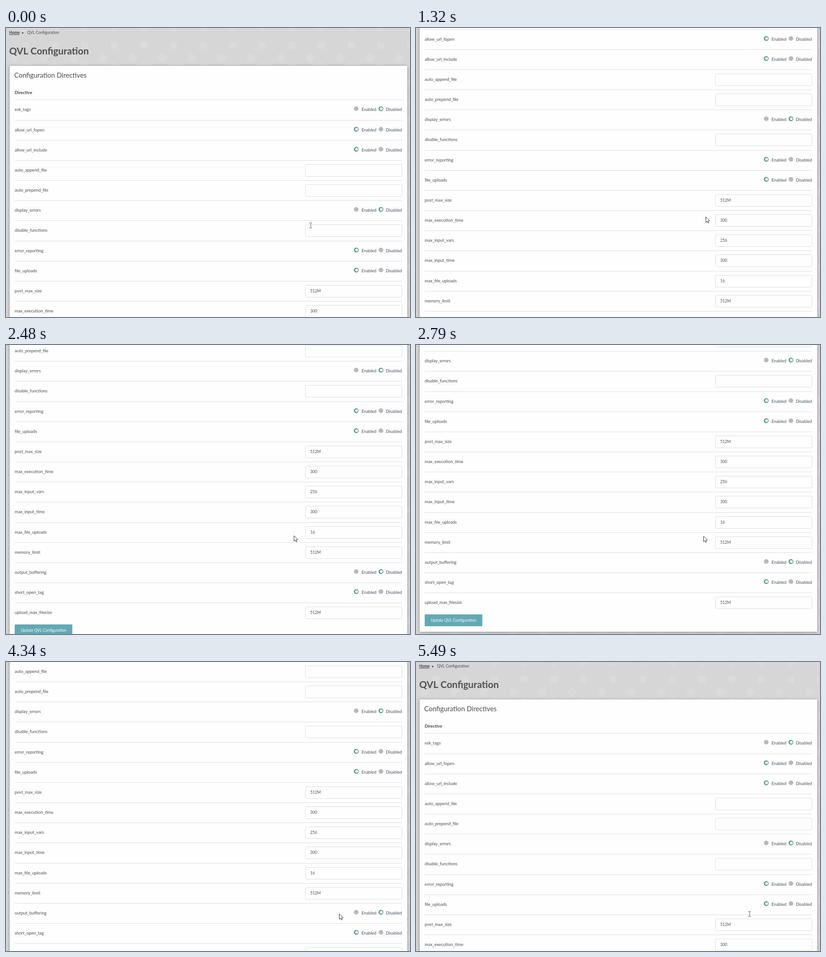
Recreate the animation shown at these times as an HTML page with a canvas. Size 883 by 634 pixels, loop 5.57 s.

```html
<!DOCTYPE html>
<html lang="en">
<head>
<meta charset="utf-8">
<title>Configuration</title>
<style>
html, body { margin: 0; width: 100%; height: 100%; overflow: hidden; background: #d6d6d6; }
canvas { display: block; }
</style>
</head>
<body>
<canvas id="stage" width="883" height="634"></canvas>
<script>
const W = 883, H = 634, LOOP = 5570;
const STEPS = 72, STEP = LOOP / STEPS;
const TOP = 157.4, PITCH = 44.17;
const FONT = 'Lato, "Open Sans", sans-serif';
const INK = '#4b4b4b';

const ctx = document.getElementById('stage').getContext('2d');

// true/false: radio state, string: text field
const rows = Object.entries({
  esk_tags: false, allow_url_fopen: true, allow_url_include: true,
  auto_append_file: '', auto_prepend_file: '', display_errors: false,
  disable_functions: '', error_reporting: true, file_uploads: true,
  post_max_size: '512M', max_execution_time: '300', max_input_vars: '256',
  max_input_time: '300', max_file_uploads: '16', memory_limit: '512M',
  output_buffering: false, short_open_tag: true, upload_max_filesize: '512M'
});

// key points: [step, value...]
const scrollKeys = [
  [0, 0], [8, 70], [17, 199], [25, 306], [28, 338], [31, 338],
  [36, 365], [52, 365], [56, 291], [63, 150], [64, 150], [71, 1]
];
const pointerKeys = [
  [0, 666, 433], [8, 636, 411], [36, 628, 419], [38, 628, 419],
  [45, 757, 593], [46, 757, 593], [51, 728, 552], [71, 729, 553]
];

function sample(keys, k) {
  const i = Math.max(1, keys.findIndex(key => key[0] >= k));
  const [from, ...a] = keys[i - 1];
  const [to, ...b] = keys[i];
  const f = (k - from) / (to - from);
  return a.map((v, n) => Math.round(v + (b[n] - v) * f));
}

const lineY = i => TOP + PITCH * i;

function text(str, x, y, size, color = INK, weight = 400, align = 'left') {
  ctx.font = `${weight} ${size}px ${FONT}`;
  ctx.fillStyle = color;
  ctx.textAlign = align;
  ctx.fillText(str, x, y);
}

function disc(x, y, r, color) {
  ctx.fillStyle = color;
  ctx.beginPath();
  ctx.arc(x, y, r, 0, Math.PI * 2);
  ctx.fill();
}

function tile(x, y, size, angle, color) {
  ctx.save();
  ctx.translate(x, y);
  ctx.rotate(angle);
  ctx.fillStyle = color;
  ctx.fillRect(-size / 2, -size / 2, size, size);
  ctx.restore();
}

function backdrop() {
  ctx.fillStyle = '#d6d6d6';
  ctx.fillRect(0, 0, W, H);
  for (let y = 0; y < H; y += 81) {
    for (let x = -22; x < W + 30; x += 64.7) {
      tile(x, y + 2, 14, 0.6, '#d9d9d9');
      tile(x, y + 38, 15, 0.05, '#dbdbdb');
      tile(x + 40, y + 66, 16, 0.45, '#dadada');
    }
  }
}

function radio(x, y, on) {
  if (!on) return disc(x, y, 5.1, '#b9b9b9');
  disc(x, y, 5.2, '#559a83');
  disc(x + 0.7, y, 3.1, '#fff');
}

function field(y, value) {
  ctx.strokeStyle = '#dedede';
  ctx.lineWidth = 1;
  ctx.beginPath();
  ctx.roundRect(654.5, y + 9.5, 211, 26, 2.5);
  ctx.stroke();
  text(value, 665, y + 25, 8.7);
}

function header(s) {
  text('Home', 7, 13 - s, 8.5, '#3f3f3f', 700);
  ctx.fillRect(7, 14 - s, 22, 1);
  text('▸', 35, 13 - s, 8.5);
  text('QVL Configuration', 46, 13 - s, 8.5);
  text('QVL Configuration', 7, 58 - s, 20.8, '#4f4f4f', 700);
}

function row([name, value], y) {
  ctx.fillStyle = '#dedede';
  ctx.fillRect(19, y, 847, 1);
  text(name, 19, y + 25, 9.4);
  if (typeof value === 'string') return field(y, value);
  radio(765.5, y + 20, value);
  radio(819.5, y + 20, !value);
  text('Enabled', 777, y + 25, 9.3, '#4a525c');
  text('Disabled', 865.5, y + 25, 9.3, '#4a525c', 400, 'right');
}

function card(s) {
  ctx.save();
  ctx.shadowColor = 'rgba(0,0,0,.38)';
  ctx.shadowBlur = 6;
  ctx.shadowOffsetY = 1;
  ctx.fillStyle = '#fefefe';
  ctx.fillRect(8, 83 - s, 869, 911);
  ctx.restore();

  text('Configuration Directives', 18, 109 - s, 14.8);
  text('Directive', 19, 145 - s, 9.4, '#444', 700);
  rows.forEach((entry, i) => row(entry, Math.round(lineY(i) - s)));

  ctx.fillStyle = '#63a9b4';
  ctx.beginPath();
  ctx.roundRect(19, 956 - s, 126, 26, 1.5);
  ctx.fill();
  text('Update QVL Configuration', 82, 972 - s, 8.5, '#fff', 400, 'center');
}

function overField(x, y, s) {
  if (x < 654 || x > 866) return false;
  return rows.some(([, value], i) => {
    const d = y + s - lineY(i);
    return typeof value === 'string' && d > 8 && d < 36;
  });
}

function beam(x, y) {
  ctx.fillStyle = '#555';
  ctx.fillRect(x - 0.5, y - 5, 1, 10);
  for (const dy of [-6, 5]) {
    ctx.fillRect(x - 3, y + dy, 2.5, 1);
    ctx.fillRect(x + 0.5, y + dy, 2.5, 1);
  }
}

function arrow(x, y) {
  ctx.save();
  ctx.translate(x + 0.5, y + 0.5);
  ctx.fillStyle = '#fff';
  ctx.strokeStyle = '#333';
  ctx.lineWidth = 1;
  const shape = new Path2D('M0 0V12L2.8 9.4 4.7 13.5 6.6 12.6 4.8 8.7 8.5 8.5Z');
  ctx.fill(shape);
  ctx.stroke(shape);
  ctx.restore();
}

function pointer(k) {
  const [x, y] = sample(pointerKeys, k);
  // the hover state trails the scroll by one step
  const [s] = sample(scrollKeys, Math.max(0, k - 1));
  (overField(x, y, s) ? beam : arrow)(x, y);
}

function draw(time) {
  const k = Math.min(STEPS - 1, Math.floor((time % LOOP) / STEP + 0.25));
  const [s] = sample(scrollKeys, k);
  backdrop();
  header(s);
  card(s);
  pointer(k);
}

let start;
function tick(now) {
  start ??= now;
  draw(now - start);
  requestAnimationFrame(tick);
}
draw(0);
requestAnimationFrame(tick);
</script>
</body>
</html>
```
